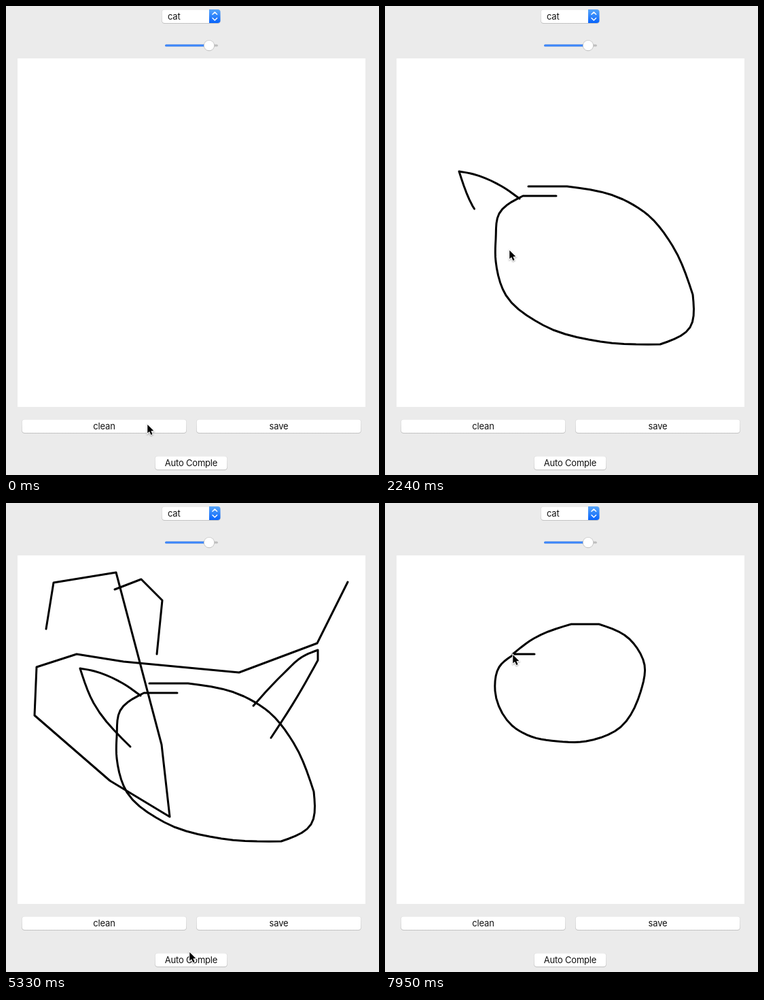
An HTML page with a canvas for the animation above (8 s loop, 549 by 689 pixels).

```html
<!DOCTYPE html>
<html lang="en">
<head>
<meta charset="utf-8">
<title>Sketch completion</title>
<style>
  html, body { margin: 0; width: 100%; height: 100%; overflow: hidden; background: #ebebeb; }
  canvas { display: block; }
</style>
</head>
<body>
<canvas id="stage" width="549" height="689"></canvas>
<script>
const LOOP = 8000, STEP = 57, CLEAR = 6080, CHORDS = 5;
const ctx = document.getElementById('stage').getContext('2d');

const add = (a, b, k = 1) => [a[0] + b[0] * k, a[1] + b[1] * k];
const mix = (a, b, k) => [a[0] + (b[0] - a[0]) * k, a[1] + (b[1] - a[1]) * k];
const dist = (a, b) => Math.hypot(b[0] - a[0], b[1] - a[1]);

function pairs(xy) {
  return Array.from({ length: xy.length / 2 }, (_, i) => [xy[2 * i], xy[2 * i + 1]]);
}

// Hand-drawn bend through key points, cut into short chords
function bend(...xy) {
  const p = pairs(xy), last = p.length - 1;
  if (last < 2) return p;
  const h = p.slice(1).map((b, i) => dist(p[i], b));
  const slope = h.map((len, i) => mix([0, 0], add(p[i + 1], p[i], -1), 1 / len));
  const v = p.map((_, i) => i && i < last
    ? mix(slope[i - 1], slope[i], h[i - 1] / (h[i - 1] + h[i])) : null);
  v[0] = mix(v[1], slope[0], 1.5);
  v[last] = mix(v[last - 1], slope[last - 1], 1.5);
  const out = [p[0]];
  for (let i = 0; i < last; i++) {
    for (let j = 1; j <= CHORDS; j++) {
      const u = j / CHORDS, w = 1 - u;
      const base = mix(p[i], p[i + 1], u * u * (3 - 2 * u));
      out.push(add(add(base, v[i], h[i] * u * w * w), v[i + 1], -h[i] * u * u * w));
    }
  }
  return out;
}

function stroke(...runs) {
  const points = runs.flat();
  const length = points.reduce((sum, p, i) => i ? sum + dist(points[i - 1], p) : 0, 0);
  return { points, length };
}

// The part of a stroke that covers a fraction of its length
function trace({ points, length }, fraction) {
  let left = fraction * length;
  const out = [points[0]];
  for (let i = 1; i < points.length && left > 1e-6; i++) {
    const d = dist(points[i - 1], points[i]);
    if (d) out.push(mix(points[i - 1], points[i], Math.min(1, left / d)));
    left -= d;
  }
  return out;
}

const body = stroke(
  bend(252,279, 203,279),
  bend(203,279, 168,305, 163,343, 163,375, 178,425, 233,469, 317,493, 405,497),
  bend(405,497, 449,472, 453,424),
  bend(453,424, 423,352, 387,307, 350,284, 268,265),
  bend(268,265, 211,265));
const leftEar = stroke(
  bend(198,283, 172,265, 130,247, 109,243),
  bend(109,243, 129,294, 183,358));
const rightEar = stroke(
  bend(364,298, 409,250, 436,226, 459,216),
  bend(459,216, 459,231),
  bend(459,231, 429,284, 390,345));
const tuft = stroke(pairs([160,127, 199,112, 230,143, 222,222]));
const sweep = stroke(pairs([59,185, 70,117, 162,102, 229,355, 241,461, 153,408,
  42,312, 45,241, 104,222, 173,233, 343,249, 458,206, 503,116]));
const head = stroke(
  bend(220,222, 191,222),
  bend(191,222, 168,241, 162,276, 187,327, 215,343, 253,350, 296,350, 347,329,
    376,278, 382,238, 360,200, 315,178),
  bend(315,178, 274,178),
  bend(274,178, 219,199, 188,222));

const span = (start, end, path, from = 0, to = 1) => ({ start, end, path, from, to });
const go = (start, end, x, y) => ({ start, end, target: [x, y], from: 0, to: 1 });

const ink = [
  span(463, 860, body, 0, 0.325), span(860, 1310, body, 0.325),
  span(1832, 2365, leftEar),
  span(2833, 3400, rightEar),
  span(4442, 4560, tuft), span(4560, 4790, sweep),
  span(6603, 6890, head, 0, 0.116), span(6890, 7950, head, 0.116)
];
const moves = [
  go(65, 340, 252, 279),
  span(463, 1250, body), go(1250, 1310, 200, 267),
  go(1433, 1720, 198, 283),
  span(1832, 2240, leftEar), go(2240, 2590, 362, 299),
  go(2653, 2710, 364, 298),
  span(2833, 3290, rightEar), go(3290, 3400, 381, 360),
  go(3513, 3740, 264, 675),
  go(3913, 4080, 278, 666),
  go(5273, 5330, 270, 659),
  go(5330, 5780, 199, 618),
  go(6023, 6420, 220, 222),
  span(6603, 6890, head, 0, 0.163), span(6890, 7780, head, 0.163)
];

// Motion advances in discrete screen refreshes
function progress(t, { start, end, from, to }) {
  const n = Math.max(1, Math.round((end - start) / STEP));
  const k = Math.min(n, Math.floor((t - start) / (end - start) * n + 1e-6));
  return from + (to - from) * k / n;
}

function drawInk(t) {
  ctx.strokeStyle = '#000';
  ctx.lineWidth = 3;
  ctx.lineCap = ctx.lineJoin = 'round';
  const reach = new Map();
  for (const part of ink) {
    const cleared = t >= CLEAR && part.start < CLEAR;
    if (t >= part.start && !cleared) reach.set(part.path, progress(t, part));
  }
  for (const [path, fraction] of reach) {
    if (!fraction) continue;
    ctx.beginPath();
    for (const p of trace(path, fraction)) ctx.lineTo(...p);
    ctx.stroke();
  }
}

function roundBox(x, y, w, h, r, fill) {
  ctx.beginPath();
  ctx.roundRect(x, y, w, h, r);
  ctx.fillStyle = fill;
  ctx.fill();
}

function shade(y, h, top, bottom) {
  const g = ctx.createLinearGradient(0, y, 0, y + h);
  g.addColorStop(0, top);
  g.addColorStop(1, bottom);
  return g;
}

function label(text, x, y, align, color = '#111') {
  ctx.font = '13px Inter, Roboto, sans-serif';
  ctx.letterSpacing = '-0.2px';
  ctx.textAlign = align;
  ctx.fillStyle = color;
  ctx.fillText(text, x, y);
}

function plate(x, y, w, fill = '#fff') {
  roundBox(x, y, w, 21, 4.5, shade(y, 21, '#dcdcdc', '#c2c2c2'));
  roundBox(x + 0.7, y + 0.6, w - 1.4, 19.4, 4, fill);
}

function button(text, x, y, w, pressed) {
  plate(x, y, w, pressed ? shade(y, 20, '#5ba5f8', '#0a62f5') : '#fff');
  label(text, x + w / 2, y + 15, 'center', pressed ? '#fff' : '#111');
}

function drawSelect() {
  plate(229, 5, 87);
  roundBox(299, 5, 16.5, 20, [0, 4, 4, 0], shade(5, 20, '#58a6fa', '#0763fb'));
  label('cat', 238, 20, 'left');
  ctx.strokeStyle = '#fff';
  ctx.lineWidth = 1.5;
  ctx.lineCap = ctx.lineJoin = 'round';
  for (const dir of [-1, 1]) {
    ctx.beginPath();
    ctx.moveTo(304, 15 + dir * 2.7);
    ctx.lineTo(307.3, 15 + dir * 6);
    ctx.lineTo(310.6, 15 + dir * 2.7);
    ctx.stroke();
  }
}

function drawSlider() {
  roundBox(234, 56.5, 78, 3, 1.5, '#bebebe');
  roundBox(234, 56.5, 65, 3, 1.5, '#3b86fb');
  roundBox(291, 50.2, 16, 16, 8, '#bcbcbc');
  roundBox(291.7, 50.7, 14.6, 14.6, 7.3, '#fff');
}

function cursorAt(t) {
  let pos = [208, 614];
  for (const move of moves) {
    if (t < move.start) break;
    const k = progress(t, move);
    pos = move.path ? trace(move.path, k).pop() : mix(pos, move.target, k);
  }
  return pos.map(Math.round);
}

function drawCursor(t) {
  ctx.save();
  ctx.translate(...cursorAt(t));
  ctx.beginPath();
  for (const p of pairs([0.3,1, 0.3,13.6, 3.1,11, 5.4,16, 7.6,15, 5.4,10.2, 9.3,10])) {
    ctx.lineTo(...p);
  }
  ctx.closePath();
  ctx.shadowColor = 'rgba(0,0,0,0.35)';
  ctx.shadowBlur = 2;
  ctx.shadowOffsetY = 1;
  ctx.strokeStyle = '#fff';
  ctx.lineWidth = 2;
  ctx.lineJoin = 'miter';
  ctx.stroke();
  ctx.shadowColor = 'transparent';
  ctx.fillStyle = '#000';
  ctx.fill();
  ctx.restore();
}

function draw(t) {
  ctx.fillStyle = '#ebebeb';
  ctx.fillRect(0, 0, 549, 689);
  ctx.fillStyle = '#fff';
  ctx.fillRect(17, 77, 512, 512);
  drawSelect();
  drawSlider();
  button('clean', 23, 607, 243);
  button('save', 280, 607, 243);
  button('Auto Comple', 219, 661, 107, t >= 4320 && t < 4500);
  drawInk(t);
  drawCursor(t);
}

const origin = performance.now();
function tick() {
  draw((performance.now() - origin) % LOOP);
  requestAnimationFrame(tick);
}
tick();
</script>
</body>
</html>
```
